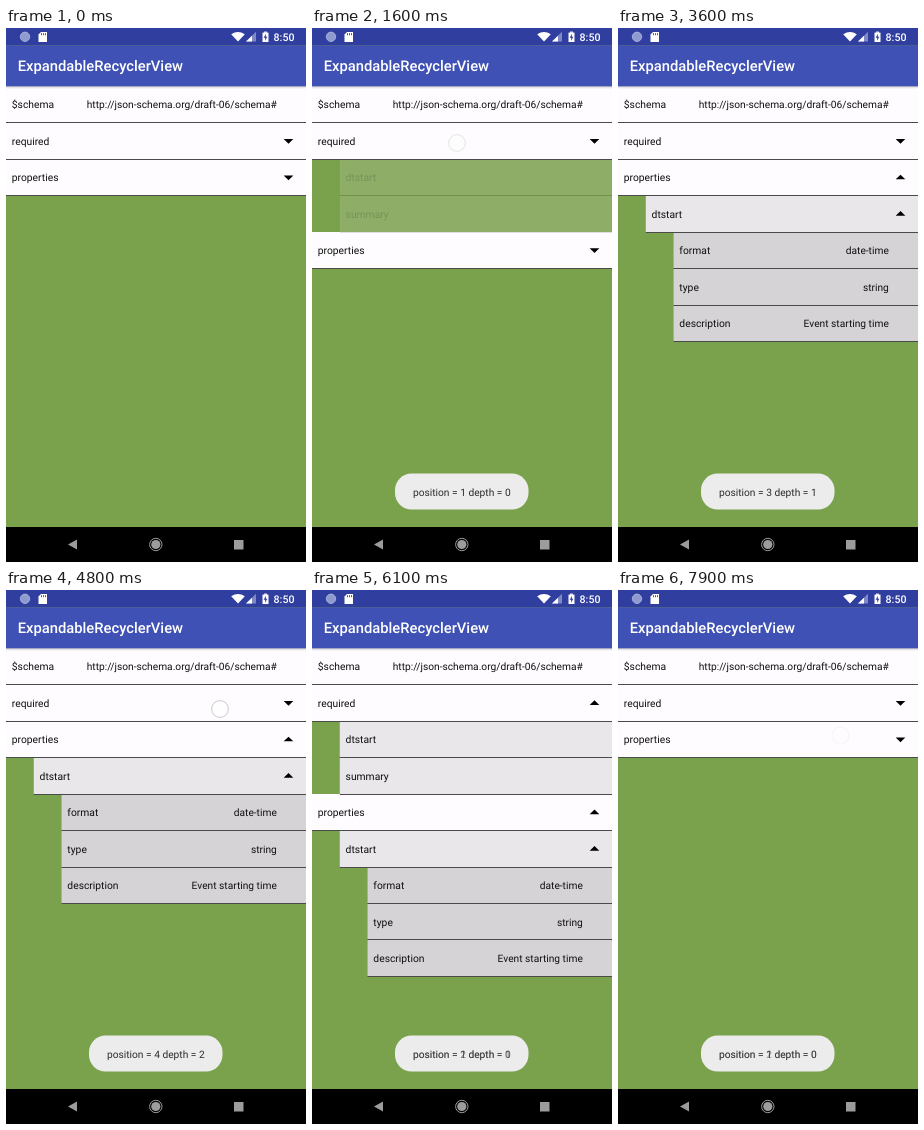
Recreate the animation shown at these times as an HTML page with a canvas. Size 300 by 534 pixels, loop 8 s.

```html
<!DOCTYPE html>
<html lang="en">
<head>
<meta charset="utf-8">
<title>Expandable list</title>
<style>
  html, body { margin: 0; width: 100%; height: 100%; overflow: hidden; background: #000; }
  canvas { display: block; width: 100vw; height: 100vh; }
</style>
</head>
<body>
<canvas id="stage" width="300" height="534"></canvas>
<script>
const ctx = document.getElementById('stage').getContext('2d');
ctx.textRendering = 'geometricPrecision';

const LOOP = 8000, STEP = 100;
const WIDTH = 300, LIST_TOP = 58.3, ROW = 36.46, INDENT = 27.78;
const FADE = 120, MOVE = 250;
const ROW_COLORS = ['#fefcfe', '#e9e7ea', '#d5d3d6'];

const leaf = (name, value) => ({ name, value });
const group = (name, ...children) => ({ name, children });

const required = group('required', leaf('dtstart'), leaf('summary'));
const dtstart = group('dtstart',
  leaf('format', 'date-time'),
  leaf('type', 'string'),
  leaf('description', 'Event starting time')
);
const properties = group('properties', dtstart);
const rows = [leaf('$schema', 'http://json-schema.org/draft-06/schema#'), required, properties];

const tap = (down, up, x, y, position, depth, toggles) =>
  ({ down, up, x, y, toggles, message: `position = ${position} depth = ${depth}` });
const taps = [
  tap(500, 630, 145, 115, 1, 0, required),
  tap(1400, 1500, 145, 115, 1, 0, required),
  tap(2100, 2190, 145, 143.3, 2, 0, properties),
  tap(3000, 3200, 145, 186, 3, 1, dtstart),
  tap(3900, 4170, 145, 223.5, 4, 2),
  tap(4800, 4894, 214, 119, 1, 0, required),
  tap(5800, 5900, 214, 155, 2, 1),
  tap(6500, 6687, 220, 117, 1, 0, required),
  tap(7700, 7740, 222.5, 145.5, 2, 0, properties)
];

const clamp = v => Math.min(1, Math.max(0, v));
const ease = v => (1 - Math.cos(Math.PI * clamp(v))) / 2;

function rect(x, y, w, h, color) {
  ctx.fillStyle = color;
  ctx.fillRect(x, y, w, h);
}

function shape(color, ...points) {
  ctx.fillStyle = color;
  ctx.beginPath();
  points.forEach(([x, y]) => ctx.lineTo(x, y));
  ctx.fill();
}

function circle(x, y, r, fill, stroke, lineWidth = 1) {
  ctx.beginPath();
  ctx.arc(x, y, r, 0, 2 * Math.PI);
  if (fill) { ctx.fillStyle = fill; ctx.fill(); }
  if (stroke) { ctx.strokeStyle = stroke; ctx.lineWidth = lineWidth; ctx.stroke(); }
}

function text(str, x, y, { size = 10.21, weight = 400, color = '#101010', align = 'left' } = {}) {
  ctx.font = `${weight} ${size}px Roboto, sans-serif`;
  ctx.fillStyle = color;
  ctx.textAlign = align;
  ctx.fillText(str, x, y);
}

// Rows leave by fading before the list closes up, and appear after it has made room.
function expansion(node, t) {
  const toggles = taps.filter(p => p.toggles === node && p.up <= t);
  const open = toggles.length % 2 === 1;
  if (!toggles.length) return { open, alpha: 0, space: 0 };
  const age = t - toggles[toggles.length - 1].up;
  return open
    ? { open, alpha: clamp((age - MOVE) / FADE), space: ease(age / MOVE) }
    : { open, alpha: 1 - clamp(age / FADE), space: 1 - ease((age - FADE) / MOVE) };
}

function drawArrow(y, up) {
  const tip = up ? -2.8 : 2.7, base = up ? 1.9 : -2;
  shape('#000', [277.7, y + base], [287.3, y + base], [282.5, y + tip]);
}

function drawRow(node, y, depth, open) {
  const x = depth * INDENT, top = Math.floor(y + 0.5), line = Math.floor(y + ROW);
  const center = y + ROW / 2;
  rect(x, top, WIDTH - x, line - top, ROW_COLORS[depth]);
  rect(x, line, WIDTH - x, 1, '#4a4a4a');
  text(node.name, x + 5.8, center + 3.8, { size: 10.3 });
  if (node.value) text(node.value, 270.8, center + 3.8, { align: 'right' });
  if (node.children) drawArrow(center, open);
}

// Drawn from the bottom up, so that each divider lies over the row below it.
function drawList(nodes, y, depth, alpha, t) {
  const draws = [];
  for (const node of nodes) {
    const state = node.children && expansion(node, t), top = y;
    draws.unshift(() => {
      if (state && alpha * state.alpha > 0) {
        drawList(node.children, top + ROW, depth + 1, alpha * state.alpha, t);
      }
      ctx.globalAlpha = alpha;
      drawRow(node, top, depth, state && state.open);
    });
    y += ROW * (1 + (state ? node.children.length * state.space : 0));
  }
  draws.forEach(draw => draw());
  ctx.globalAlpha = 1;
}

function drawStatusBar() {
  rect(0, 0, WIDTH, 17.5, '#303f9f');
  circle(19, 8.8, 4.7, '#8f9bd0', '#b4bce0', 0.8);
  shape('#fff', [35, 4], [41, 4], [41, 14], [32.5, 14], [32.5, 6.6]);
  for (const x of [35, 37, 39]) rect(x, 5.2, 0.9, 2, '#303f9f');

  ctx.fillStyle = '#fff';
  ctx.beginPath();
  ctx.moveTo(232, 13.5);
  ctx.lineTo(225.2, 6.2);
  ctx.quadraticCurveTo(232, 1.6, 238.8, 6.2);
  ctx.fill();

  shape('#7f89c4', [240, 13.5], [250, 13.5], [250, 3.8]);
  shape('#fff', [240, 13.5], [246, 13.5], [246, 7.7]);
  rect(256.5, 4.6, 6, 9.4, '#fff');
  rect(258, 3.6, 3, 1.2, '#fff');
  shape('#303f9f', [260, 5.8], [257.6, 9.8], [259.2, 9.8], [259, 12.8], [261.4, 8.8], [259.8, 8.8]);
  text('8:50', 267.6, 12.8, { size: 10.6, weight: 500, color: '#fff' });
}

function drawAppBar() {
  rect(0, 17.5, WIDTH, 40.8, '#3f51b5');
  text('ExpandableRecyclerView', 11.7, 43.2, { size: 14.75, weight: 500, color: '#fff' });
  const shadow = ctx.createLinearGradient(0, 58, 0, 61);
  shadow.addColorStop(0, 'rgba(0,0,0,.2)');
  shadow.addColorStop(1, 'rgba(0,0,0,0)');
  rect(0, 58, WIDTH, 3, shadow);
}

function drawNavBar() {
  const gray = '#9c9c9c';
  rect(0, 499, WIDTH, 35, '#000');
  shape(gray, [62, 516.5], [71, 511.5], [71, 521.5]);
  circle(149.8, 516.5, 6.2, null, gray);
  circle(149.8, 516.5, 4.6, gray);
  rect(228, 512, 9.5, 9.5, gray);
}

function drawToast(t) {
  const progress = p => clamp((t - p.up - 100) / 300);
  const shown = taps.filter(p => progress(p) > 0);
  if (!shown.length) return;
  const [previous, current] = [shown[shown.length - 2], shown[shown.length - 1]];
  const fade = progress(current);
  const message = ({ message }, alpha) => {
    ctx.globalAlpha = Math.sqrt(alpha);
    text(message, 149.8, 467.6, { color: '#2c2c2c', align: 'center' });
  };

  ctx.globalAlpha = previous ? 1 : fade;
  ctx.fillStyle = '#ececec';
  ctx.beginPath();
  ctx.roundRect(83, 445.6, 133.5, 35.9, 16.5);
  ctx.fill();
  if (previous) message(previous, 1 - fade);
  message(current, fade);
  ctx.globalAlpha = 1;
}

function drawTouch({ down, up, x, y }, t) {
  if (t < down) return;
  ctx.globalAlpha = 1 - clamp((t - up) / 200);
  circle(x, y, 8.4, 'rgba(255,255,255,.6)', 'rgba(0,0,0,.16)', 1.2);
  ctx.globalAlpha = 1;
}

function draw(t) {
  rect(0, 0, WIDTH, 534, '#7aa14c');
  drawList(rows, LIST_TOP, 0, 1, t);
  drawStatusBar();
  drawAppBar();
  drawNavBar();
  drawToast(t);
  for (const p of taps) drawTouch(p, t);
}

const start = performance.now();
function frame() {
  const t = (performance.now() - start) % LOOP;
  draw(Math.floor(t / STEP) * STEP);
  requestAnimationFrame(frame);
}
frame();
</script>
</body>
</html>
```
